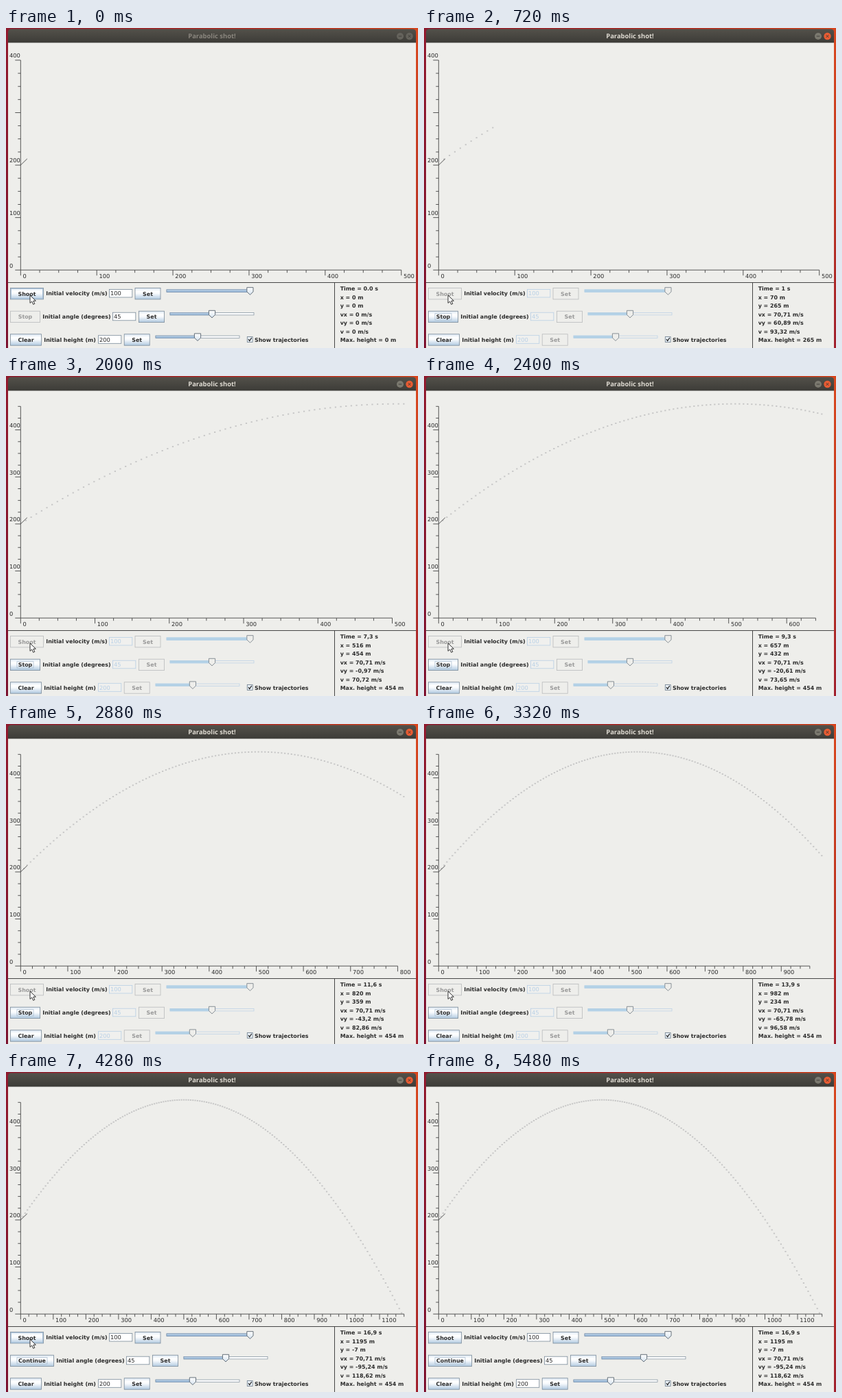
Animation of 600x467 px, one loop 6.92 s. Source, as an HTML page:

```html
<!DOCTYPE html>
<html lang="en">
<head>
<meta charset="utf-8">
<title>Parabolic shot</title>
<style>
html, body { margin: 0; width: 100%; height: 100%; overflow: hidden; background: #eeeeeb; }
svg { display: block; width: 600px; height: 467px; }
text { font: bold 7.92px "DejaVu Sans", sans-serif; fill: #2b2b2b; text-rendering: geometricPrecision; white-space: pre; }
.num { font-weight: normal; font-size: 8.3px; }
.title { font: bold 9.4px "Open Sans", sans-serif; }
.axis { stroke: #444; stroke-width: .9; fill: none; }
</style>
</head>
<body>
<svg viewBox="0 0 600 467">
  <defs>
    <linearGradient id="top"><stop stop-color="#8d1a2e"/><stop offset=".6" stop-color="#b52a22"/><stop offset="1" stop-color="#d8441d"/></linearGradient>
    <linearGradient id="left" x2="0" y2="1"><stop stop-color="#921a2f"/><stop offset="1" stop-color="#7c1230"/></linearGradient>
    <linearGradient id="right" x2="0" y2="1"><stop stop-color="#d9481f"/><stop offset=".5" stop-color="#c03822"/><stop offset="1" stop-color="#a0202e"/></linearGradient>
    <linearGradient id="bar" x2="0" y2="1"><stop stop-color="#53514a"/><stop offset="1" stop-color="#3c3b37"/></linearGradient>
    <linearGradient id="btn" x2="0" y2="1"><stop stop-color="#dde8f3"/><stop offset=".3" stop-color="#fff"/><stop offset=".5" stop-color="#f6f9fc"/><stop offset="1" stop-color="#b0c9e0"/></linearGradient>
    <linearGradient id="fill" x2="0" y2="1"><stop stop-color="#c5d8ea"/><stop offset="1" stop-color="#8fb2d4"/></linearGradient>
    <linearGradient id="knob" x2="0" y2="1"><stop stop-color="#fff"/><stop offset="1" stop-color="#d5e2ee"/></linearGradient>
  </defs>
  <rect width="600" height="467" fill="url(#top)"/>
  <rect y="3" width="3" height="464" fill="url(#left)"/>
  <rect x="597" y="3" width="3" height="464" fill="url(#right)"/>
  <path d="M3 22V6Q3 1.5 8 1.5H592Q597 1.5 597 6V22Z" fill="url(#bar)"/>
  <rect x="3" y="21.5" width="594" height="446" fill="#eeeeeb"/>
  <g id="view"></g>
</svg>
<script>
const LOOP = 6920;
const V = 100 * Math.SQRT1_2, H0 = 200, G = 9.8196;   // launch speed per axis, start height, gravity
const PX = 0.66, X0 = 21.3, Y0 = 353.2;              // screen scale and plot origin
const START = 8, DONE = 64;
const view = document.getElementById('view');

const height = t => H0 + V * t - G * t * t / 2;
const num = v => String(Math.round(v * 100) / 100).replace('.', ',');
const fix = v => +v.toFixed(2);

const rect = (x, y, w, h, fill, stroke = 'none', sw = .8) =>
  `<rect x="${fix(x)}" y="${fix(y)}" width="${fix(w)}" height="${fix(h)}" fill="${fill}" stroke="${stroke}" stroke-width="${sw}"/>`;
const text = (x, y, s, attrs = '') => `<text x="${fix(x)}" y="${fix(y)}" ${attrs}>${s}</text>`;
const path = (d, attrs) => `<path d="${d}" ${attrs}/>`;

// Frames tick at 15 per second, snapped to a 40 ms grid
const tick = ms => Math.floor((Math.floor(ms / 40) + .5) * .6);

function simTime(k) {
  if (k < START) return 0;
  const t = k <= 50 ? 1 + (k - 11) * .331 : 13.9 + (Math.min(k, 60) - 50) * .29;
  return k >= 63 ? 16.9 : Math.round(t * 10) / 10;
}

function cursorAt(k) {
  if (k > 81) return null;
  const u = Math.min(1, Math.max(0, (k - 70) / 11));
  const s = u * u * (3 - 2 * u), r = 1 - s;
  const mix = (a, b, c, d) => r * r * r * a + 3 * r * r * s * b + 3 * r * s * s * c + s * s * s * d;
  return { x: mix(35, 10, 60, 378), y: mix(390, 500, 440, 312) };
}

function titleBar(active) {
  const glyph = 'fill="none" stroke="#3a3934" stroke-width=".9"';
  return text(300, 15.2, 'Parabolic shot!', `class="title" text-anchor="middle" style="fill:${active ? '#dfdbd2' : '#8a867e'}"`) +
    `<circle cx="574" cy="12" r="5" fill="${active ? '#7b796f' : '#65635c'}"/>` + path('M571.7 12H576.3', glyph) +
    `<circle cx="587.5" cy="12" r="5.2" fill="${active ? '#e95c33' : '#65635c'}"/>` +
    path('M585.6 10.1L589.4 13.9M589.4 10.1L585.6 13.9', glyph);
}

function plot(t) {
  const maxX = Math.max(500, V * t);
  const maxY = Math.max(400, height(Math.min(t, V / G)));
  const stepX = Math.round(842 * 25 / maxX) * PX;
  const stepY = Math.round(470 * 25 / maxY) * PX;
  const nx = Math.floor(maxX / 25), ny = Math.floor(maxY / 25);
  let d = `M${X0} ${fix(Y0 - ny * stepY)}V${Y0}H${fix(X0 + nx * stepX)}`, out = '';
  for (let i = 0; i <= nx; i++) {
    const x = X0 + i * stepX, major = i % 4 === 0;
    d += `M${fix(x)} ${Y0}v${major ? 8 : 4}`;
    if (major) out += text(x + 3.3, 364.8, i * 25, 'class="num"');
  }
  for (let i = 0; i <= ny; i++) {
    const y = Y0 - i * stepY, major = i % 4 === 0;
    d += `M${X0} ${fix(y)}h${major ? -8 : -4}`;
    if (major && !(i === 12 && maxY <= 400)) out += text(5, y - 3.6, i * 25, 'class="num"');
  }
  d += `M${X0} ${fix(Y0 - H0 / 25 * stepY)}l9.5 -9.2`;
  for (let n = 1; n <= Math.round(t * 10); n++) {
    const s = n / 10, y = height(s);
    if (y < 0) break;
    out += rect(X0 + V * s / maxX * 558 - 1.1, Y0 - y / maxY * 312.5 - 1, 2.2, 1.9, '#c6c6c6');
  }
  return { svg: out + path(d, 'class="axis"'), maxY };
}

function button(x, y, w, label, o) {
  const { on = true, focus = false, down = false, cur } = o;
  const over = on && cur && cur.x > x && cur.x < x + w && cur.y > y && cur.y < y + 17;
  let out = rect(x + .5, y + .5, w - 1, 16.4, !on ? '#eeeeeb' : down ? '#b8cfe5' : 'url(#btn)', on ? '#7a8a99' : '#b9bbbc');
  if (over) out += rect(x + 1.4, y + 1.4, w - 2.8, 14.6, 'none', '#a3bdd6', 1);
  if (focus) out += rect(x + 10, y + 4, w - 20, 9.4, 'none', '#a3b8cc', .7);
  return out + text(x + w / 2, y + 11.6, label, `text-anchor="middle"${on ? '' : ' style="fill:#999"'}`);
}

function field(x, y, value, on) {
  return rect(x + .4, y + .4, 33.4, 11.6, on ? '#fff' : '#f0f0ee', on ? '#7a8a99' : '#b8cfe5') +
    text(x + 2, y + 9.2, value, `class="num"${on ? '' : ' style="fill:#b8d0e6"'}`);
}

function slider(x, y, part, on) {
  const c = x + 2 + 118 * part, edge = on ? '#7a8a99' : '#b8cfe5';
  return rect(x, y, 122, 3.4, on ? '#fff' : '#eeeeeb', edge, .7) +
    rect(x, y, c - x, 3.4, on ? 'url(#fill)' : '#b3d1e6', on ? '#7a94b4' : '#b3d1e6', .7) +
    path(`M${fix(c - 4.6)} ${y - 3.2}h9.2v6.2l-4.6 4.4l-4.6 -4.4Z`,
      `fill="${on ? 'url(#knob)' : '#eeeeeb'}" stroke="${on ? '#56616c' : '#7d868e'}" stroke-width=".9"`);
}

function controls(k, cur, maxY) {
  const run = k >= START && k < DONE, on = !run, ended = k >= DONE;
  const shift = ended ? 20 : 0;
  return button(6, 379, 49, 'Shoot', { on, cur, down: k === 6 || k === 7 }) +
    button(6, 412.7, 44 + shift, ended ? 'Continue' : 'Stop', { on: k >= START, focus: k >= START, cur }) +
    button(6, 446.3, 46, 'Clear', { cur }) +
    text(58.3, 390.4, 'Initial velocity (m/s)') + field(150, 381, 100, on) +
    button(187.5, 379, 38, 'Set', { on }) + slider(234, 381.9, 1.012, on) +
    text(53.3 + shift, 424.2, 'Initial angle (degrees)') + field(155 + shift, 414.8, 45, on) +
    button(193 + shift, 412.7, 38, 'Set', { on }) + slider(239 + shift, 415.5, .5, on) +
    text(55.3, 457.8, 'Initial height (m)') + field(134, 448.3, 200, on) +
    button(171.7, 446.3, 38, 'Set', { on }) + slider(218, 449.1, H0 / maxY, on) +
    rect(351.3, 450.6, 7.8, 7.8, '#e6eef6', '#6d7c8a') +
    path('M353 454.2l1.7 2.4l3 -4.6', 'fill="none" stroke="#222" stroke-width="1.2"') +
    text(362, 457.8, 'Show trajectories');
}

function readout(t) {
  const vy = V - G * t, live = t > 0;
  const val = v => live ? v : 0;
  const top = height(Math.min(t, V / G));
  return [
    `Time = ${live ? num(t) : '0.0'} s`,
    `x = ${val(Math.trunc(V * t))} m`,
    `y = ${val(Math.trunc(height(t)))} m`,
    `vx = ${val(num(V))} m/s`,
    `vy = ${val(num(vy))} m/s`,
    `v = ${val(num(Math.hypot(V, vy)))} m/s`,
    `Max. height = ${val(Math.trunc(top))} m`
  ].map((s, i) => text(486.7, 383.1 + i * 12.52, s)).join('');
}

function pointer(p) {
  return path(`M${fix(p.x)} ${fix(p.y)}v11.4l2.7 -2.4l2 4.4l2.1 -1l-2 -4.2h3.6Z`,
    'fill="#fff" stroke="#1c1c1c" stroke-width=".9" stroke-linejoin="round"');
}

function draw(k) {
  const t = simTime(k), cur = cursorAt(k), p = plot(t);
  view.innerHTML = titleBar(k >= 6) + p.svg +
    path('M3 371.5H597M478.5 371.5V467', 'stroke="#333" stroke-width=".9" fill="none"') +
    controls(k, cur, p.maxY) + readout(t) + (cur ? pointer(cur) : '');
}

let last = -1;
function frame(now) {
  const k = tick(now % LOOP);
  if (k !== last) draw(last = k);
  requestAnimationFrame(frame);
}
frame(performance.now());
</script>
</body>
</html>
```
